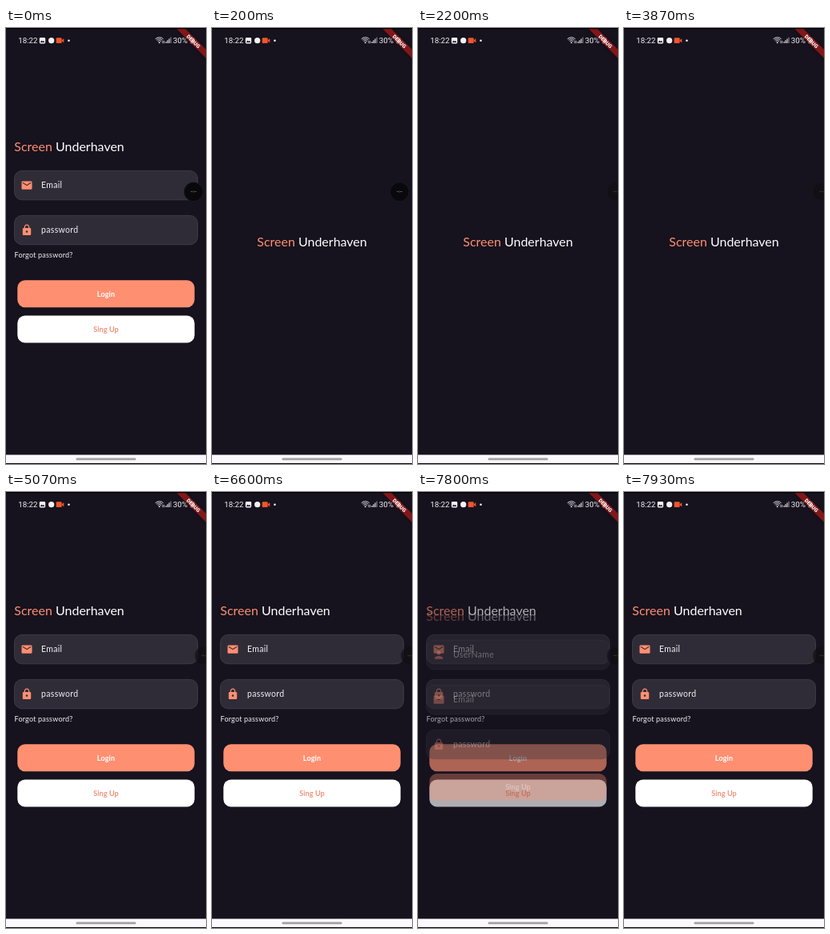
These frames come from a looping animation (250 px wide and 545 px high, 8000 ms). An HTML page with a canvas:

```html
<!DOCTYPE html>
<html lang="en">
<head>
<meta charset="utf-8">
<title>Login flow</title>
<style>
  html, body { margin: 0; width: 100%; height: 100%; overflow: hidden; background: #000; }
  canvas { display: block; width: 250px; height: 545px; }
</style>
</head>
<body>
<canvas id="stage"></canvas>
<script>
const W = 250, H = 545, LOOP = 8000;
const BG = '#16121e', ORANGE = '#ff8f71', WHITE = '#ffffff';
const LATO = 'Lato, sans-serif', ROBOTO = 'Roboto, sans-serif';

const canvas = document.getElementById('stage');
const ctx = canvas.getContext('2d');
const ratio = window.devicePixelRatio || 1;
canvas.width = W * ratio;
canvas.height = H * ratio;
ctx.scale(ratio, ratio);

const ICONS = {
  mail: new Path2D('M20 4H4c-1.1 0-2 .9-2 2v12c0 1.1.9 2 2 2h16c1.1 0 2-.9 2-2V6c0-1.1-.9-2-2-2zm0 4l-8 5-8-5V6l8 5 8-5v2z'),
  lock: new Path2D('M18 8h-1V6c0-2.8-2.2-5-5-5S7 3.2 7 6v2H6c-1.1 0-2 .9-2 2v10c0 1.1.9 2 2 2h12c1.1 0 2-.9 2-2V10c0-1.1-.9-2-2-2zm-6 9c-1.1 0-2-.9-2-2s.9-2 2-2 2 .9 2 2-.9 2-2 2zm3.1-9H8.9V6c0-1.7 1.4-3.1 3.1-3.1s3.1 1.4 3.1 3.1v2z'),
  person: new Path2D('M12 12c2.2 0 4-1.8 4-4s-1.8-4-4-4-4 1.8-4 4 1.8 4 4 4zm0 2c-2.7 0-8 1.3-8 4v2h16v-2c0-2.7-5.3-4-8-4z')
};

const clamp = v => Math.max(0, Math.min(1, v));
const easeOut = v => 1 - (1 - clamp(v)) ** 3;

function rect(x, y, w, h, color) {
  ctx.fillStyle = color;
  ctx.fillRect(x, y, w, h);
}

function rounded(x, y, w, h, r, fill, stroke) {
  ctx.beginPath();
  ctx.roundRect(x, y, w, h, r);
  ctx.fillStyle = fill;
  ctx.fill();
  if (stroke) {
    ctx.strokeStyle = stroke;
    ctx.lineWidth = 0.7;
    ctx.stroke();
  }
}

function disc(x, y, r, color) {
  ctx.beginPath();
  ctx.arc(x, y, r, 0, Math.PI * 2);
  ctx.fillStyle = color;
  ctx.fill();
}

function text(str, x, y, font, color, align = 'left', spacing = 0) {
  ctx.font = font;
  ctx.letterSpacing = spacing + 'px';
  ctx.textAlign = align;
  ctx.fillStyle = color;
  ctx.fillText(str, x, y);
}

function title(y, centered) {
  const first = 'Screen ', second = 'Underhaven', font = '16px ' + LATO;
  ctx.font = font;
  ctx.letterSpacing = '0px';
  const w1 = ctx.measureText(first).width;
  const x = centered ? (W - w1 - ctx.measureText(second).width) / 2 : 10.3;
  text(first, x, y, font, ORANGE);
  text(second, x + w1, y, font, WHITE);
}

function field(y, icon, label) {
  rounded(10.5, y + 0.4, 229, 36.4, 9.5, '#302c37', '#4a4651');
  ctx.save();
  ctx.translate(18.2, y + 10.8);
  ctx.scale(0.651, 0.651);
  ctx.fillStyle = ORANGE;
  ctx.fill(ICONS[icon]);
  ctx.restore();
  text(label, 44, y + 22.3, '10.5px ' + LATO, '#f1f0f2', 'left', 0.33);
}

function button(y, label, fill, color) {
  rounded(14.3, y, 221.4, 34, 9.5, fill);
  text(label, 125, y + 20.2, 'bold 9.1px ' + LATO, color, 'center', 0.07);
}

const SCREENS = {
  splash() { title(273, true); },
  login() {
    title(153.5);
    field(178, 'mail', 'Email');
    field(234, 'lock', 'password');
    text('Forgot password?', 10.5, 287, '9.1px ' + LATO, '#f1f0f2', 'left', 0.16);
    button(315.3, 'Login', ORANGE, WHITE);
    button(359.5, 'Sing Up', WHITE, '#ee9279');
  },
  signUp() {
    title(160.5);
    field(185, 'person', 'UserName');
    field(241, 'mail', 'Email');
    field(297, 'lock', 'password');
    button(352, 'Sing Up', ORANGE, WHITE);
  }
};

function screen(name, alpha = 1) {
  ctx.save();
  ctx.globalAlpha = alpha;
  rect(0, 0, W, H, BG);
  SCREENS[name]();
  ctx.restore();
}

function statusBar() {
  text('18:22', 15.2, 19, '9.8px ' + ROBOTO, '#f2f2f4');

  rounded(41.8, 12, 7.4, 7.4, 1.4, '#f2f2f4');
  ctx.beginPath();
  ctx.moveTo(42.8, 18);
  ctx.lineTo(44.5, 15.6);
  ctx.lineTo(45.7, 16.9);
  ctx.lineTo(46.7, 15.8);
  ctx.lineTo(48.3, 18);
  ctx.fillStyle = BG;
  ctx.fill();

  disc(56.7, 15.7, 3.6, '#f2f2f4');

  rounded(62.7, 12.3, 7, 6.8, 1.2, '#f0562a');
  ctx.beginPath();
  ctx.moveTo(69.3, 15.7);
  ctx.lineTo(72.3, 13);
  ctx.lineTo(72.3, 18.4);
  ctx.fill();
  disc(78.5, 15.7, 1.3, '#f2f2f4');

  ctx.strokeStyle = '#dddce0';
  ctx.lineWidth = 1;
  for (const r of [3, 5, 7]) {
    ctx.beginPath();
    ctx.arc(191.7, 18.7, r, -Math.PI * 0.75, -Math.PI * 0.25);
    ctx.stroke();
  }
  disc(191.7, 18.2, 1, '#dddce0');
  rect(195.4, 15.8, 0.8, 3.4, '#dddce0');
  rect(197, 15.8, 0.8, 3.4, '#dddce0');
  for (let i = 0; i < 4; i++) {
    const h = 2 + i * 1.8;
    rect(199.4 + i * 2, 19 - h, 1.2, h, i < 3 ? '#dddce0' : '#85828c');
  }
  text('30%', 208.8, 19, '9.8px ' + ROBOTO, '#f2f2f4');
  rounded(230.5, 12, 5.2, 7.6, 1.3, '#e4e3e6');
}

function debugBanner() {
  ctx.save();
  ctx.translate(W, 1);
  ctx.rotate(Math.PI / 4);
  ctx.shadowColor = 'rgba(0,0,0,0.5)';
  ctx.shadowBlur = 4 * ratio;
  rect(-40, 18.2, 80, 7.8, 'rgba(183,28,28,0.68)');
  ctx.shadowColor = 'transparent';
  text('DEBUG', 0, 24.5, '900 6.5px ' + ROBOTO, WHITE, 'center');
  ctx.restore();
}

function bubble(t) {
  const awake = t < 1500;
  const x = awake ? 234.4 : 235.4 + 12.6 * easeOut((t - 1530) / 400);
  ctx.save();
  ctx.globalAlpha = awake ? 1 : 0.5;
  disc(x, 204.7, 12.2, '#1d1b20');
  disc(x, 204.7, 11.4, '#09080b');
  text('--:--', x, 206.2, '5.6px ' + ROBOTO, '#c9c8cc', 'center');
  ctx.restore();
}

function systemEdges() {
  rect(0, 0, W, 1.2, '#000');
  rect(0, 533.5, W, 10.5, '#fbf9fc');
  rounded(87.5, 537.6, 75, 2.6, 1.3, '#a3a1a5');
  rect(0, 544, W, 1, '#000');
}

function pages(t) {
  if (t >= 70 && t < 5000) return screen('splash');
  screen('login');
  if (t >= 6670 && t < 6730) screen('signUp', 0.5);
  else if (t >= 6730 && t < 7870) screen('signUp', 1 - clamp((t - 7670) / 200));
}

function draw(now) {
  const t = now % LOOP;
  pages(t);
  statusBar();
  debugBanner();
  bubble(t);
  systemEdges();
}

const start = performance.now();
function tick() {
  draw(performance.now() - start);
  requestAnimationFrame(tick);
}
tick();
</script>
</body>
</html>
```
